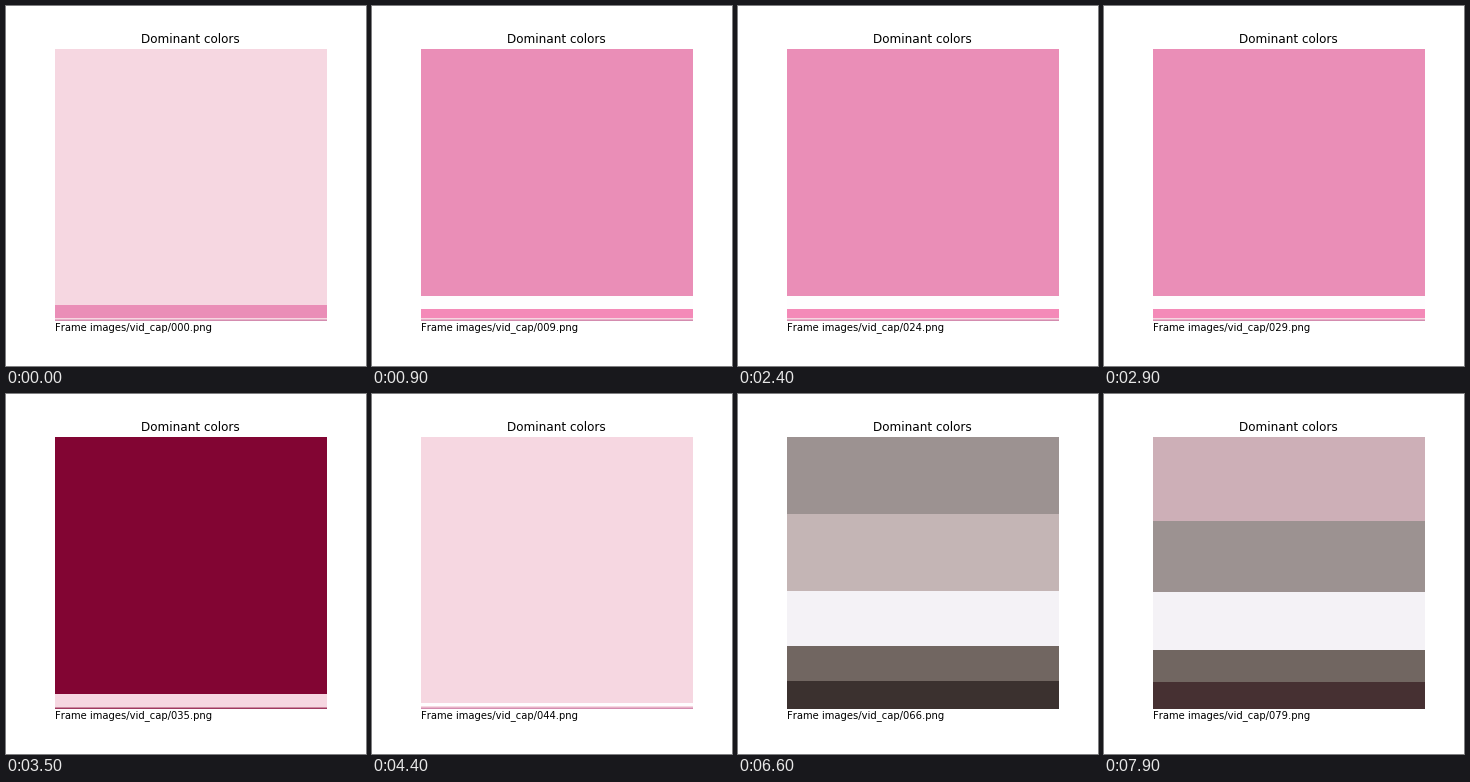
A matplotlib script that plays this animation: 360x360 px, repeating every 8000 ms.

```python
import numpy as np
import matplotlib.pyplot as plt
from matplotlib.animation import FuncAnimation
from matplotlib.patches import Rectangle

plt.rcParams["font.family"] = "DejaVu Sans"
plt.rcParams["text.kerning_factor"] = 6

SIZE, DPI = 360, 72
FRAMES, STEP = 80, 100
LEFT, TOP, SIDE, TAIL = 49, 43, 272, 3


def rgb(code):
    return np.array([int(code[k:k + 2], 16) for k in (0, 2, 4)]) / 255


LIGHT, PINK, HOT = rgb("f6d7e1"), rgb("ea8eb7"), rgb("f48ab8")
DARK, ROSE, WHITE = rgb("820533"), rgb("d48caf"), rgb("fefdfe")
ASH, SNOW, UMBER = rgb("9c9291"), rgb("f4f2f6"), rgb("716661")
MAUVE = rgb("c4b5b5"), rgb("cdafb7")
COAL = rgb("3b312f"), rgb("463032")


def mix(a, b, t):
    return a + (b - a) * np.clip(t, 0, 1)


def stack(bands, start, end):
    """Bands of (height, colour), then a thin graded tail that fills the square."""
    first, *rest = bands
    main = SIDE - TAIL - sum(h for h, _ in rest)
    return [(main, first), *rest] + [(1, mix(start, end, k / (TAIL - 1)))
                                     for k in range(TAIL)]


CARDS = [
    stack([PALE := LIGHT, (13, PINK)], LIGHT, ROSE),
    stack([PINK, (13, WHITE), (9, HOT)], LIGHT, ROSE),
    stack([DARK, (12, LIGHT)], LIGHT, mix(LIGHT, DARK, 0.75)),
]


def calm(i):
    fade = (i - 45) / 12
    return stack([LIGHT, (3, WHITE)], mix(LIGHT, WHITE, fade),
                 mix(ROSE, mix(ASH, ROSE, 0.2), fade))


def footage(i):
    """Five clusters, largest first, drifting in size and tint."""
    drift, tint = (i - 66) / 13, (i - 66) / 6
    clusters = [
        (mix(77.2, 71, drift), ASH),
        (mix(76.8, 84, drift), mix(*MAUVE, tint)),
        (mix(55, 58, drift), SNOW),
        (mix(35, 32, drift), UMBER),
        (mix(28, 27, drift), mix(*COAL, tint)),
    ]
    return sorted(clusters, key=lambda c: -c[0])


def scene(i):
    if i < 36:
        return CARDS[i // 6 % 3]
    return calm(i) if i < 64 else footage(i)


fig = plt.figure(figsize=(SIZE / DPI, SIZE / DPI), dpi=DPI, facecolor="white")
ax = fig.add_axes([0, 0, 1, 1])
ax.set(xlim=(0, SIZE), ylim=(SIZE, 0))
ax.axis("off")
ax.text(184.5, 37.2, "Dominant colors", fontsize=12, ha="center")
label = ax.text(LEFT, 324, "", fontsize=10)
bars = [ax.add_patch(Rectangle((LEFT, TOP), SIDE, 0, lw=0, antialiased=False))
        for _ in range(6)]


def draw(i):
    bands = scene(i)
    edges = TOP + np.round(np.cumsum([0] + [h for h, _ in bands]))
    for k, bar in enumerate(bars):
        bar.set_visible(k < len(bands))
        if k < len(bands):
            bar.set_y(edges[k])
            bar.set_height(edges[k + 1] - edges[k])
            bar.set_facecolor(bands[k][1])
    label.set_text(f"Frame images/vid_cap/{i:03d}.png")
    return bars + [label]


anim = FuncAnimation(fig, draw, frames=FRAMES, interval=STEP,
                     repeat=True, repeat_delay=0)
plt.show()
```
